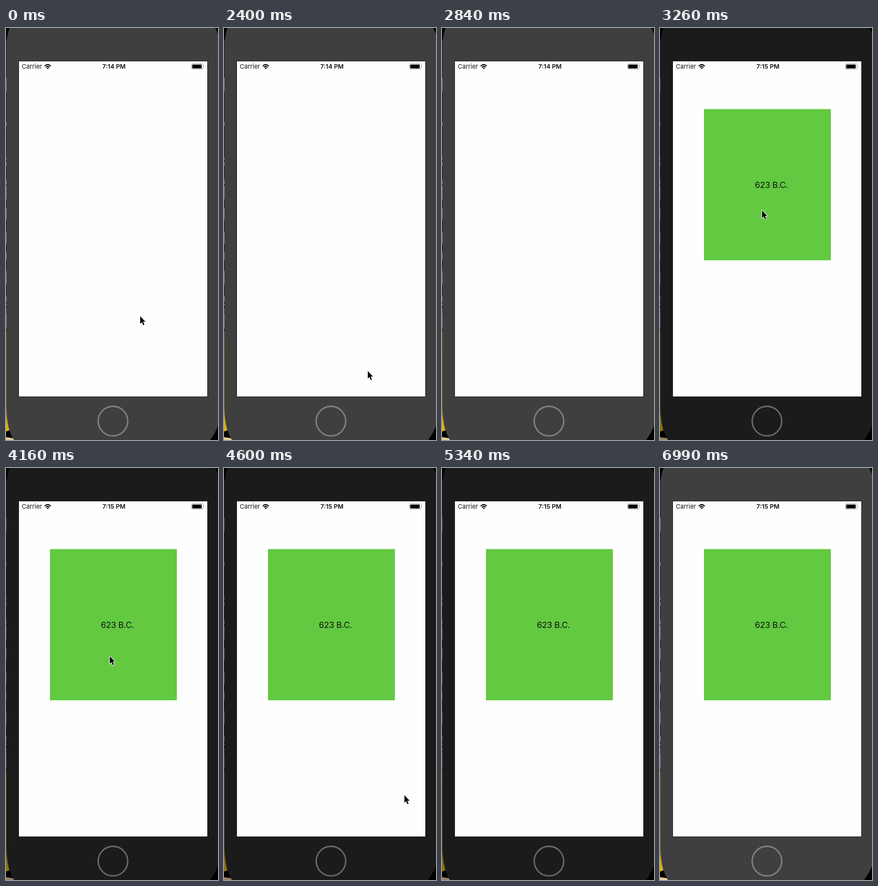
These frames come from a looping animation (376x729 px, 7090 ms). An HTML page:

```html
<!DOCTYPE html>
<html lang="en">
<head>
<meta charset="utf-8">
<title>Phone simulator</title>
<style>
  html, body { margin: 0; width: 100%; height: 100%; overflow: hidden; background: #000; }
  svg { display: block; width: 376px; height: 729px; }
  text { font-family: Inter, "Liberation Sans", sans-serif; fill: #111; }
  .status { font-size: 11px; }
  .clock { font-weight: 600; text-anchor: middle; }
  .year { font-size: 15px; letter-spacing: -.25px; text-anchor: middle; }

  .body, .ring, .edge, .before, .after, .cursor {
    animation: 7.09s step-end infinite;
  }
  .body { animation-name: body; }
  .ring { animation-name: ring; }
  .edge { animation-name: edge; }
  .before { animation-name: before; }
  .after { animation-name: after; }
  .cursor { animation-name: cursor; }

  /* The window loses focus colour while active: 3260 ms to 6990 ms */
  @keyframes body {
    0%, 98.589% { fill: #3f3f3f; }
    45.98% { fill: #1b1b1b; }
  }
  @keyframes ring {
    0%, 98.589% { stroke: #7f7f7f; }
    45.98% { stroke: #686868; }
  }
  @keyframes edge {
    0%, 98.589% { opacity: 1; }
    45.98% { opacity: .65; }
  }
  @keyframes before {
    0% { visibility: visible; }
    45.98%, 100% { visibility: hidden; }
  }
  @keyframes after {
    0% { visibility: hidden; }
    45.98%, 100% { visibility: visible; }
  }
  @keyframes cursor {
    0% { transform: translate(238px, 510px); opacity: 1; }
    33.85% { transform: translate(255px, 607px); opacity: 1; }
    35.966% { transform: translate(269px, 681px); opacity: 1; }
    37.94% { transform: translate(277px, 712px); opacity: 1; }
    40.056% { transform: translate(277px, 712px); opacity: 0; }
    45.98% { transform: translate(181px, 323px); opacity: 1; }
    58.674% { transform: translate(184px, 333px); opacity: 1; }
    60.789% { transform: translate(261px, 471px); opacity: 1; }
    62.905% { transform: translate(280px, 508px); opacity: 1; }
    64.88% { transform: translate(320px, 579px); opacity: 1; }
    66.995% { transform: translate(335px, 667px); opacity: 1; }
    68.97% { transform: translate(335px, 668px); opacity: 1; }
    73.201% { transform: translate(335px, 700px); opacity: 1; }
    75.317%, 100% { transform: translate(335px, 700px); opacity: 0; }
  }
</style>
</head>
<body>
<svg viewBox="0 0 376 729">
  <defs>
    <linearGradient id="gold" x1="0" y1="0" x2="0" y2="1">
      <stop offset="0" stop-color="#87622a"/>
      <stop offset=".75" stop-color="#8d6a2a"/>
      <stop offset=".88" stop-color="#cdab1c"/>
      <stop offset="1" stop-color="#d8b51c"/>
    </linearGradient>
  </defs>

  <!-- desktop visible past the phone's edge -->
  <rect width="376" height="729" fill="#000"/>
  <g class="edge">
    <rect y="20" width="2" height="515" fill="#242424"/>
    <path stroke="#858585" stroke-width="2"
      d="M0 88v24M0 167v7M0 229v4M0 237v6M0 268v8M0 279v24M0 318v21M0 361v21M0 397v13M0 430v24M0 474v10M0 488v3M0 497v4M0 504v28"/>
    <path fill="url(#gold)" d="M0 536H3V690L6 712 0 714Z"/>
    <path fill="#e2cd9c" d="M0 724L14 726V729H0Z"/>
  </g>

  <path class="body" fill="#3f3f3f"
    d="M6 0Q1 14 1 36V672C1 697 5 714 14 729H362Q371 717 376 704V11Q374 5 371 0Z"/>
  <circle class="ring" cx="189.7" cy="695.6" r="26.2" fill="none" stroke="#7f7f7f" stroke-width="2.6"/>
  <rect x="22.5" y="58.5" width="335" height="594" fill="none" stroke="#222"/>
  <rect x="23" y="59" width="334" height="593" fill="#fefefe"/>

  <!-- status bar -->
  <text class="status" x="28" y="72">Carrier</text>
  <g fill="none" stroke="#000" stroke-width="1.9">
    <path d="M68.6 67.4Q74 62.2 79.4 67.4"/>
    <path d="M70.7 69.6Q74 66.4 77.3 69.6"/>
  </g>
  <path d="M72.1 71Q74 69.5 75.9 71L74 73Z"/>
  <text class="status clock before" x="191.5" y="72">7:14 PM</text>
  <text class="status clock after" x="191.5" y="72">7:15 PM</text>
  <rect x="328.9" y="63.4" width="20.8" height="9.4" rx="2.2" fill="none" stroke="#999" stroke-width=".9"/>
  <rect x="330.3" y="64.8" width="16.8" height="6.6" rx="1"/>
  <path d="M350.8 66.5q1.4 1.6 0 3.2z" fill="#888"/>

  <g class="after">
    <rect x="78" y="143.5" width="225" height="267.5" fill="#62c941"/>
    <text class="year" x="197.6" y="283">623 B.C.</text>
  </g>

  <path class="cursor" fill="#000" stroke="#fff" stroke-width="1.8" paint-order="stroke"
    stroke-linejoin="round" d="M0 0V13.2L3 10.4 5.2 15.8 7.4 14.9 5.1 9.7H9.3Z"/>
</svg>
</body>
</html>
```
